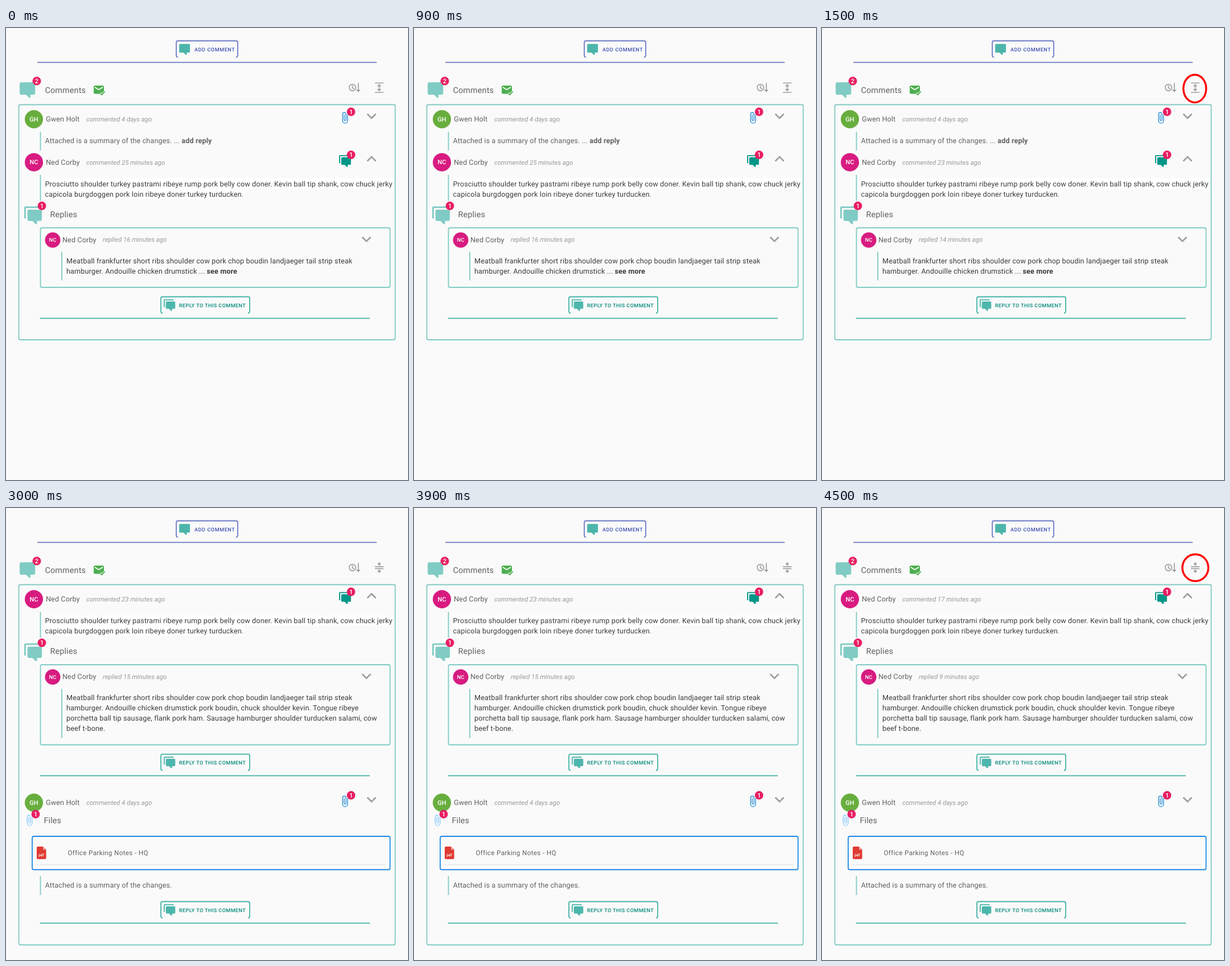
An HTML page that plays this animation: 706x793 px, repeating every 6 s.

```html
<!DOCTYPE html>
<html lang="en">
<head>
<meta charset="utf-8">
<title>Comment thread</title>
<style>
  html, body { margin: 0; width: 100%; height: 100%; overflow: hidden; background: #fafafa; }
  svg { display: block; width: 706px; height: 793px; }
  text { font: 12.6px Roboto, sans-serif; letter-spacing: .12px; fill: #616161; white-space: pre; text-rendering: geometricPrecision; }
  .title { font-size: 14.4px; letter-spacing: .13px; }
  .date { font-size: 11.4px; font-style: italic; letter-spacing: 0; fill: #999; }
  .dark { letter-spacing: .137px; fill: #3c3c3c; }
  .bold { font-weight: 700; }
  .btn { font-size: 9px; font-weight: 500; letter-spacing: .44px; fill: #00897b; }
  .add { letter-spacing: .6px; fill: #3f51b5; }
  .file { font-size: 11.7px; letter-spacing: .33px; }
  .mark { font-size: 11px; font-weight: 500; letter-spacing: 0; fill: #fff; text-anchor: middle; }
  .small { font-size: 9.4px; }
  .tiny { font-size: 6.5px; }
  .badge { fill: #e91e63; }
  .line { fill: none; stroke: #80cbc4; stroke-width: 1.8; }
  .teal { stroke: #45b3a8; }
  .indigo { stroke: #6b7ac6; }
  .icon { fill: none; stroke: #9e9e9e; stroke-width: 1.7; }
  .chevron { fill: none; stroke: #9e9e9e; stroke-width: 2.7; }
  .ring { fill: none; stroke: #f00; stroke-width: 3.4; }

  /* Hard switches: halves for the two layouts, quarters for the dates */
  .h0, .h1 { animation: half 6s step-end infinite; }
  .q0, .q1, .q2, .q3 { animation: quarter 6s step-end infinite; }
  .h1 { animation-delay: -3s; }
  .q1 { animation-delay: -4.5s; }
  .q2 { animation-delay: -3s; }
  .q3 { animation-delay: -1.5s; }
  .card { animation: card 6s step-end infinite; }
  .head { animation: head 6s step-end infinite; }
  .reply { animation: reply 6s step-end infinite; }
  @keyframes half { 0% { visibility: visible } 50%, 100% { visibility: hidden } }
  @keyframes quarter { 0% { visibility: visible } 25%, 100% { visibility: hidden } }
  @keyframes card { 0% { transform: translate(0, 0) } 50%, 100% { transform: translate(0, -75.5px) } }
  @keyframes head { 0% { transform: translate(0, 0) } 50%, 100% { transform: translate(0, 357px) } }
  @keyframes reply { 0% { transform: translate(0, 0) } 50%, 100% { transform: translate(0, -39.7px) } }
</style>
</head>
<body>
<svg viewBox="0 0 706 793">
  <defs>
    <path id="bubble" d="M15 22a1 1 0 0 0 1-1V18H20a2 2 0 0 0 2-2V4a2 2 0 0 0-2-2H4a2 2 0 0 0-2 2V16a2 2 0 0 0 2 2H10.1L13.800 21.700a1 1 0 0 0 .7.3z"/>
    <g id="bubbles">
      <path d="M3 16H1V3a2 2 0 0 1 2-2H20V3H3z"/>
      <path d="M16 23a1 1 0 0 0 1-1V19H21a2 2 0 0 0 2-2V7a2 2 0 0 0-2-2H7a2 2 0 0 0-2 2V17a2 2 0 0 0 2 2H11.100L14.800 22.700a1 1 0 0 0 .7.3z"/>
    </g>
    <path id="clip" d="M16.5 6V17.5a4 4 0 0 1-8 0V5a2.5 2.5 0 0 1 5 0V15.5a1 1 0 0 1-2 0V6H10V15.5a2.5 2.5 0 0 0 5 0V5a4 4 0 0 0-8 0V17.5a5.5 5.5 0 0 0 11 0V6z"/>
    <path id="down" class="chevron" d="M-7.5-3.7l7.5 7.4 7.5-7.4"/>
    <path id="up" class="chevron" d="M-7.5 3.7l7.5-7.4 7.5 7.4"/>
    <g id="one">
      <circle class="badge" r="7.4"/>
      <text class="mark" y="3.8">1</text>
    </g>
    <g id="replyBtn">
      <path class="line teal" d="M275 500.5Q272 499.5 272 497V474.5Q272 471.5 275 471.5H425Q428 471.5 428 474.5V497Q428 499.5 425 500.5"/>
      <use href="#bubbles" transform="translate(276.1 475.1) scale(.92)" fill="#4db6ac"/>
      <text class="btn" x="304" y="489.5">REPLY TO THIS COMMENT</text>
      <path class="line teal" d="M59.5 509.3H639"/>
    </g>
  </defs>

  <rect width="706" height="793" fill="#fafafa"/>

  <!-- Add button -->
  <path class="line indigo" d="M302 51.5Q299 50.5 299 48V25.5Q299 22.5 302 22.5H404Q407 22.5 407 25.5V48Q407 50.5 404 51.5"/>
  <use href="#bubble" transform="translate(302.2 26.2) scale(.95)" fill="#4db6ac"/>
  <text class="btn add" x="331" y="41">ADD COMMENT</text>
  <path class="line indigo" d="M55 60.3H651"/>

  <!-- Thread header -->
  <use href="#bubble" transform="translate(21.3 92.5) scale(1.36)" fill="#80cbc4"/>
  <circle class="badge" cx="54" cy="93" r="7.5"/>
  <text class="mark" x="54" y="96.8">2</text>
  <text class="title" x="68.5" y="113.5">Comments</text>
  <g transform="translate(152.2 97.4) scale(.9)">
    <path d="M4 4H20a2 2 0 0 1 2 2V20H4a2 2 0 0 1-2-2V6a2 2 0 0 1 2-2z" fill="#4caf50"/>
    <path d="M4 7l8 5 8-5" fill="none" stroke="#fafafa" stroke-width="2"/>
    <path d="M14 19l3.8 3.8L25 15.5" fill="none" stroke="#fafafa" stroke-width="5.5"/>
    <path d="M14.5 18.8l3.3 3.2 6-6.2" fill="none" stroke="#4caf50" stroke-width="2"/>
  </g>
  <g class="icon">
    <circle cx="608.5" cy="104.5" r="5.7"/>
    <path d="M608.5 101v4l2.8 1.7M618.7 96.5V111M615.6 108.2l3.1 3.1 3.1-3.1"/>
    <path class="h0" d="M648 96.5h15M648 113h15M655.5 99.5v10.5M652.5 102.5l3-3 3 3M652.5 107l3 3 3-3"/>
    <path class="h1" d="M648 102.8h15M648 106.3h15M655.5 95v5M652.7 97.2l2.8 2.8 2.8-2.8M655.5 114v-5M652.7 111.8l2.8-2.8 2.8 2.8"/>
  </g>

  <rect class="line h0" x="22.5" y="134.5" width="661" height="412.5" rx="3"/>
  <rect class="line h1" x="22.5" y="134.5" width="661" height="632" rx="3"/>

  <!-- Comment with attachment -->
  <g class="head">
    <circle cx="49" cy="160" r="16" fill="#68ae3e"/>
    <text class="mark" x="49" y="163.9">GH</text>
    <text x="70" y="164.2">Gwen Holt</text>
    <text class="date" x="141" y="164">commented 4 days ago</text>
    <use href="#clip" transform="translate(584 146.6) scale(.92)" fill="#2b8fd4"/>
    <use href="#one" x="606" y="147"/>
    <use href="#down" x="642" y="154.5"/>
  </g>
  <g class="h0">
    <path class="line" d="M60.5 182V215"/>
    <text x="68.5" y="202">Attached is a summary of the changes. ... <tspan class="bold">add reply</tspan></text>
  </g>

  <!-- Comment with replies -->
  <g class="card">
    <circle cx="49" cy="235.5" r="16" fill="#d81b80"/>
    <text class="mark" x="49" y="239.4">NC</text>
    <text x="70" y="239.8">Ned Corby</text>
    <text class="date q0" x="141" y="239.6">commented 25 minutes ago</text>
    <text class="date q1" x="141" y="239.6">commented 23 minutes ago</text>
    <text class="date q2" x="141" y="239.6">commented 23 minutes ago</text>
    <text class="date q3" x="141" y="239.6">commented 17 minutes ago</text>
    <use href="#bubbles" transform="translate(584 222) scale(.95)" fill="#009688"/>
    <use href="#one" x="606" y="222.5"/>
    <use href="#up" x="642" y="229.8"/>
    <path class="line" d="M60.5 257.5V303"/>
    <path d="M68 264H680V282H419V300H68z" fill="#fff"/>
    <text class="dark" x="68.5" y="277.5">Prosciutto shoulder turkey pastrami ribeye rump pork belly cow doner. Kevin ball tip shank, cow chuck jerky</text>
    <text class="dark" x="68.5" y="295.5">capicola burgdoggen pork loin ribeye doner turkey turducken.</text>

    <use href="#bubbles" transform="translate(30.6 311.6) scale(1.41)" fill="#80cbc4"/>
    <use href="#one" x="63" y="312"/>
    <text class="title" x="77.5" y="331.8">Replies</text>

    <rect class="line h0" x="60.5" y="350.5" width="614" height="104.5" rx="3"/>
    <rect class="line h1" x="60.5" y="350.5" width="614" height="140.5" rx="3"/>
    <circle cx="82" cy="372" r="13.5" fill="#d81b80"/>
    <text class="mark small" x="82" y="375.3">NC</text>
    <text x="99" y="375.6">Ned Corby</text>
    <text class="date q0" x="170" y="375">replied 16 minutes ago</text>
    <text class="date q1" x="170" y="375">replied 14 minutes ago</text>
    <text class="date q2" x="170" y="375">replied 15 minutes ago</text>
    <text class="date q3" x="170" y="375">replied 9 minutes ago</text>
    <use href="#down" x="633" y="370.5"/>

    <text class="dark" x="106" y="412.7">Meatball frankfurter short ribs shoulder cow pork chop boudin landjaeger tail strip steak</text>
    <g class="h0">
      <path class="line" d="M98 393V443"/>
      <text class="dark" x="106" y="430.7">hamburger. Andouille chicken drumstick ... <tspan class="bold">see more</tspan></text>
    </g>
    <g class="h1">
      <path class="line" d="M98 393V479"/>
      <text class="dark" x="106" y="430.7">hamburger. Andouille chicken drumstick pork boudin, chuck shoulder kevin. Tongue ribeye</text>
      <text class="dark" x="106" y="448.7">porchetta ball tip sausage, flank pork ham. Sausage hamburger shoulder turducken salami, cow</text>
      <text class="dark" x="106" y="466.7">beef t-bone.</text>
    </g>
  </g>
  <g class="reply"><use href="#replyBtn"/></g>

  <!-- Expanded attachment -->
  <g class="h1">
    <use href="#clip" transform="translate(30.3 537.1) scale(.9)" fill="#90caf9"/>
    <use href="#one" x="52" y="537"/>
    <text class="title" x="66.5" y="552.5">Files</text>
    <rect x="46" y="576" width="628.5" height="58.5" rx="3" fill="none" stroke="#1e88e5" stroke-width="1.8"/>
    <path d="M54 626H666" stroke="#ddd"/>
    <path d="M56 594H65L70.5 599.5V614a2 2 0 0 1-2 2H56a2 2 0 0 1-2-2V596a2 2 0 0 1 2-2z" fill="#e03a32"/>
    <path d="M65 594V599.5H70.5z" fill="#f4a09b"/>
    <text class="mark tiny" x="62" y="610.5">pdf</text>
    <text class="file" x="108.5" y="608.5">Office Parking Notes - HQ</text>
    <path class="line" d="M60.5 646V679"/>
    <text x="68.5" y="666">Attached is a summary of the changes.</text>
    <use href="#replyBtn" y="219"/>
  </g>

  <!-- Highlights -->
  <ellipse class="ring q1" cx="654.7" cy="106.3" rx="20" ry="24.3"/>
  <ellipse class="ring q3" cx="655.7" cy="104.7" rx="22.8" ry="23.5"/>
</svg>
</body>
</html>
```
